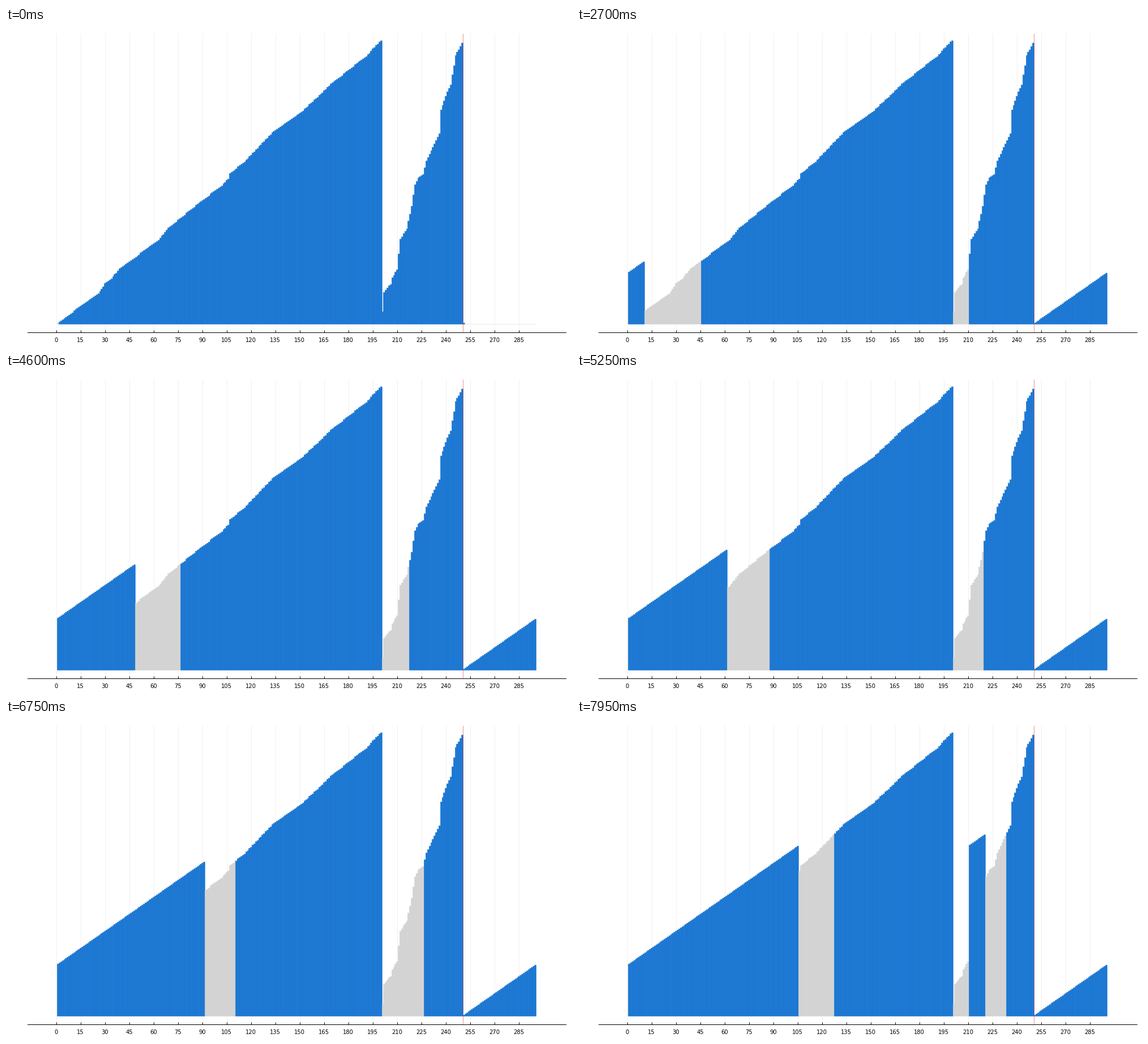
These frames come from a looping animation (998 by 561 pixels, 8 s). A matplotlib script:

```python
import numpy as np
import matplotlib.pyplot as plt
from matplotlib.animation import FuncAnimation

# Stage geometry in pixels
W, H, DPI = 998, 561, 64
PT = 72 / DPI                                  # points per pixel
LEFT, RIGHT, TOP, BOTTOM = 38, 989, 10, 537
X0, DX = 88.6, 2.8675                          # position of index 0, bar pitch
Y0, DY = 522.49, 2.0                           # baseline, height of one unit

BLUE, GREY = "#1976d2", "#d3d3d3"

# Two sorted runs (200 + 50 values) followed by an empty buffer of 45 cells
N_RIGHT, N_VALUES, N_BUFFER, BLOCK = 50, 250, 45, 15
N_CELLS = N_VALUES + N_BUFFER
N_FRAMES, INTERVAL = 160, 50

# The right run climbs between a few (rank, value) knots; the left run is the rest
knots = [(1, 11), (2, 28), (4, 32), (6, 35), (7, 41), (10, 48), (12, 75),
         (16, 84), (19, 104), (21, 123), (23, 129), (26, 132), (28, 144),
         (33, 159), (36, 168), (37, 189), (41, 205), (43, 211), (46, 237), (50, 248)]
ranks = np.arange(1, N_RIGHT + 1)
right_run = np.rint(np.interp(ranks, *zip(*knots))).astype(int)
left_run = np.setdiff1d(np.arange(1, N_VALUES + 1), right_run)
start = np.concatenate([left_run, right_run, np.zeros(N_BUFFER, int)])

# Output goes to the buffer, then to freed blocks on the left, then on the right
sources = np.argsort(start[:N_VALUES])
targets = np.r_[N_VALUES:N_CELLS, 0:7 * BLOCK, 14 * BLOCK:15 * BLOCK]


def merged(steps):
    """Cell values and occupancy after the smallest `steps` values have moved."""
    cells = start.copy()
    full = start > 0
    for k in range(steps):
        full[sources[k]] = False
        cells[targets[k]] = k + 1
        full[targets[k]] = True
    return cells, full


fig = plt.figure(figsize=(W / DPI, H / DPI), dpi=DPI, facecolor="white")
ax = fig.add_axes([LEFT / W, 1 - BOTTOM / H, (RIGHT - LEFT) / W, (BOTTOM - TOP) / H])
ax.set_xlim((LEFT - X0) / DX, (RIGHT - X0) / DX)
ax.set_ylim((Y0 - BOTTOM) / DY, (Y0 - TOP) / DY)
ax.set_axisbelow(True)
for side in ("left", "right", "top"):
    ax.spines[side].set_visible(False)
ax.spines["bottom"].set_linewidth(1 * PT)
ax.set_yticks([])
ax.set_xticks(range(0, N_CELLS, BLOCK))
ax.tick_params(axis="x", direction="in", length=4 * PT, width=1 * PT,
               pad=9.5 * PT, labelsize=10 * PT, labelfontfamily="DejaVu Sans")
ax.grid(axis="x", color="#f0f0f0", linewidth=1 * PT)

bars = ax.bar(np.arange(1, N_CELLS + 1), start, width=1, linewidth=0.5 * PT, zorder=2)
ax.axvline(N_VALUES + 0.5, color="#d62728", alpha=0.5, linewidth=1 * PT, zorder=3)


def update(frame):
    cells, full = merged(frame + 1)
    for bar, value, on in zip(bars, cells, full):
        bar.set_height(value)
        bar.set_color(BLUE if on else GREY)
    return list(bars)


anim = FuncAnimation(fig, update, frames=N_FRAMES, interval=INTERVAL,
                     init_func=lambda: update(0), repeat=True, repeat_delay=0)
plt.show()
```
